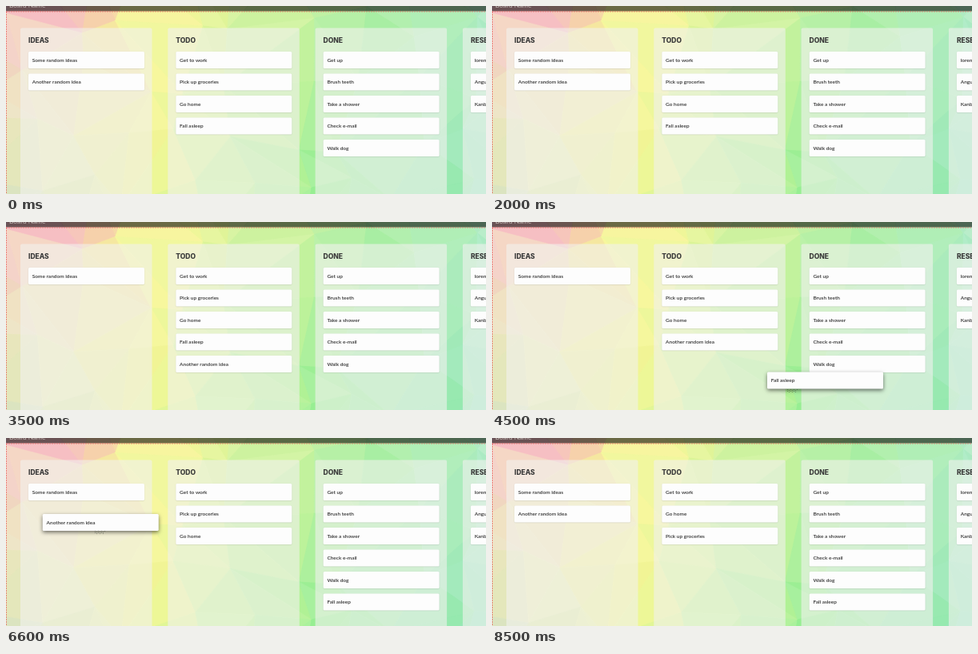
Recreate the animation shown at these times as an HTML page with a canvas. Size 600x235 px, loop 9.5 s.

```html
<!DOCTYPE html>
<html lang="en">
<head>
<meta charset="utf-8">
<title>Board</title>
<style>
html, body { margin: 0; width: 100%; height: 100%; overflow: hidden; }
canvas { display: block; width: 600px; height: 235px; }
</style>
</head>
<body>
<canvas id="board"></canvas>
<script>
const W = 600, H = 235, LOOP = 9500, TICK = 100, SETTLE = 300;
const canvas = document.getElementById('board');
const ctx = canvas.getContext('2d');
const dpr = window.devicePixelRatio || 1;

const columns = [
  { title: 'IDEAS', cards: ['Some random ideas', 'Another random idea'] },
  { title: 'TODO', cards: ['Get to work', 'Pick up groceries', 'Go home', 'Fall asleep'] },
  { title: 'DONE', cards: ['Get up', 'Brush teeth', 'Take a shower', 'Check e-mail', 'Walk dog'] },
  { title: 'RESEARCH', cards: ['lorem ipsum', 'Angular', 'Kanban'] }
];

// Each card goes from its slot through `via` to slot `slot` of column `to`.
const drags = [
  { card: 'Another random idea', to: 1, slot: 4, start: 2300, end: 3500, via: { t: 2800, x: 190, y: 169 }, grab: 7 },
  { card: 'Fall asleep', to: 2, slot: 5, start: 4100, end: 5000, via: { t: 4500, x: 344, y: 187.5 }, grab: 32 },
  { card: 'Another random idea', to: 0, slot: 1, start: 6000, end: 7000, via: { t: 6000, x: 121, y: 139 }, grab: 72 },
  { card: 'Go home', to: 1, slot: 1, start: 7600, end: 8500, via: { t: 7600, x: 211, y: 97 }, grab: 112 }
];

const mix = (a, b, k) => a + (b - a) * k;
const clamp = k => Math.max(0, Math.min(1, k));
const colX = i => 18 + i * 184.3;
const slotAt = (col, i) => ({ x: colX(col) + 10, y: 57 + i * 27.5 });

// Pink corner, yellow at a third of the width, then green to mint.
function tone(x, y, shade) {
  const v = clamp(y / H), p = clamp(x / 190), q = clamp((x - 190) / 410);
  const hue = mix(mix(-20, 75, v ** 0.6), 62, p) + 78 * q ** mix(1.1, 0.65, v) + 10 * v * q;
  const sat = mix(mix(mix(72, 40, v), 86, p), 60, q);
  const light = mix(mix(mix(88, 82, v), 78, p), mix(82, 75, v), q) + shade;
  return `hsl(${hue}, ${sat}%, ${light}%)`;
}

function triangle(g, points, shade) {
  const mean = k => (points[0][k] + points[1][k] + points[2][k]) / 3;
  g.fillStyle = g.strokeStyle = tone(mean(0), mean(1), shade);
  g.lineWidth = 0.7;
  g.beginPath();
  points.forEach(p => g.lineTo(p[0], p[1]));
  g.closePath();
  g.fill();
  g.stroke();
}

function lowPoly(g) {
  let seed = 11;
  const random = () => (seed = seed * 16807 % 2147483647) / 2147483647;
  const cell = 68;
  const vertex = (r, c) => [(c - 1 + random() * 0.7) * cell, (r - 1 + random() * 0.7) * cell];
  const grid = Array.from({ length: 6 }, (_, r) => Array.from({ length: 12 }, (_, c) => vertex(r, c)));
  const shade = () => random() * 3 - 1.5;
  for (let r = 0; r < 5; r++) {
    for (let c = 0; c < 11; c++) {
      const a = grid[r][c], b = grid[r][c + 1], d = grid[r + 1][c], e = grid[r + 1][c + 1];
      const flip = random() < 0.5;
      triangle(g, flip ? [a, b, e] : [a, b, d], shade());
      triangle(g, flip ? [a, e, d] : [b, e, d], shade());
    }
  }
}

function box(g, x, y, w, h, r, fill) {
  g.fillStyle = fill;
  g.beginPath();
  g.roundRect(x, y, w, h, r);
  g.fill();
}

function dashes(g, x1, y1, x2, y2) {
  g.beginPath();
  g.moveTo(x1, y1);
  g.lineTo(x2, y2);
  g.stroke();
}

function label(g, text, x, y, font, fill) {
  g.font = font;
  g.fillStyle = fill;
  g.fillText(text, x, y);
}

function makeBackdrop() {
  const layer = document.createElement('canvas');
  layer.width = W * dpr;
  layer.height = H * dpr;
  const g = layer.getContext('2d');
  g.scale(dpr, dpr);
  lowPoly(g);
  g.fillStyle = 'rgba(0,0,0,.57)';
  g.fillRect(0, 0, W, 6.5);
  label(g, 'Board Name', 4, 1.8, '8.3px Lato, sans-serif', '#c9c1bd');
  g.strokeStyle = '#e8605c';
  g.setLineDash([2, 1]);
  dashes(g, 0, 7, W, 7);
  dashes(g, 0.5, 7, 0.5, H);
  columns.forEach((col, i) => {
    box(g, colX(i), 27.5, 164.5, H, 2, 'rgba(242,242,238,.6)');
    label(g, col.title, colX(i) + 10, 46.4, '800 8.5px Inter, sans-serif', '#3a3a3a');
  });
  return layer;
}

function drawCard(text, { x, y }, lifted) {
  ctx.save();
  ctx.shadowColor = lifted ? 'rgba(0,0,0,.55)' : 'rgba(0,0,0,.13)';
  ctx.shadowBlur = (lifted ? 5 : 1.5) * dpr;
  ctx.shadowOffsetY = (lifted ? 2 : 0.6) * dpr;
  box(ctx, x, y, 145, 21, 1.5, '#fdfdfd');
  ctx.restore();
  label(ctx, text, x + 4.8, y + 12.8, '600 6.5px Lato, sans-serif', '#303030');
}

// Speckled tip of the pointer below the lifted card.
function drawPointer(x, y) {
  ctx.fillStyle = 'rgba(40,50,40,.4)';
  for (let r = 0; r < 4; r++) {
    for (let c = r % 2 * 2; c < 14 - r; c += 4) ctx.fillRect(Math.round(x) - 7 + c, Math.round(y) + r, 1, 1);
  }
}

function glide(from, to, k) {
  const eased = Math.sin(clamp(k) * Math.PI / 2);
  return { x: mix(from.x, to.x, eased), y: mix(from.y, to.y, eased) };
}

function dragPoint({ start, end, via, to, slot }, from, t) {
  return t < via.t
    ? glide(from, via, (t - start) / (via.t - start))
    : glide(via, slotAt(to, slot), (t - via.t) / (end - via.t));
}

function layoutAt(t) {
  const lists = columns.map(col => [...col.cards]);
  let lifted = null;
  for (const d of drags.filter(d => t >= d.start)) {
    const home = lists.findIndex(list => list.includes(d.card));
    const index = lists[home].indexOf(d.card);
    const dropped = t >= d.end;
    if (t < d.start + SETTLE) {
      lists[home][index] = null;
    } else {
      lists[home].splice(index, 1);
      lists[d.to].splice(d.slot, 0, dropped ? d.card : null);
    }
    if (!dropped) lifted = { ...d, at: dragPoint(d, slotAt(home, index), t) };
  }
  return { lists, lifted };
}

canvas.width = W * dpr;
canvas.height = H * dpr;
const backdrop = makeBackdrop();

function draw(t) {
  const { lists, lifted } = layoutAt(t);
  ctx.setTransform(dpr, 0, 0, dpr, 0, 0);
  ctx.drawImage(backdrop, 0, 0, W, H);
  lists.forEach((list, i) => list.forEach((text, j) => {
    if (text) drawCard(text, slotAt(i, j), false);
  }));
  if (lifted) {
    drawPointer(lifted.at.x + lifted.grab, lifted.at.y + 21.5);
    drawCard(lifted.card, lifted.at, true);
  }
}

const begin = performance.now();
function tick() {
  const t = (performance.now() - begin) % LOOP;
  draw(Math.floor(t / TICK) * TICK);
  requestAnimationFrame(tick);
}
tick();
</script>
</body>
</html>
```
